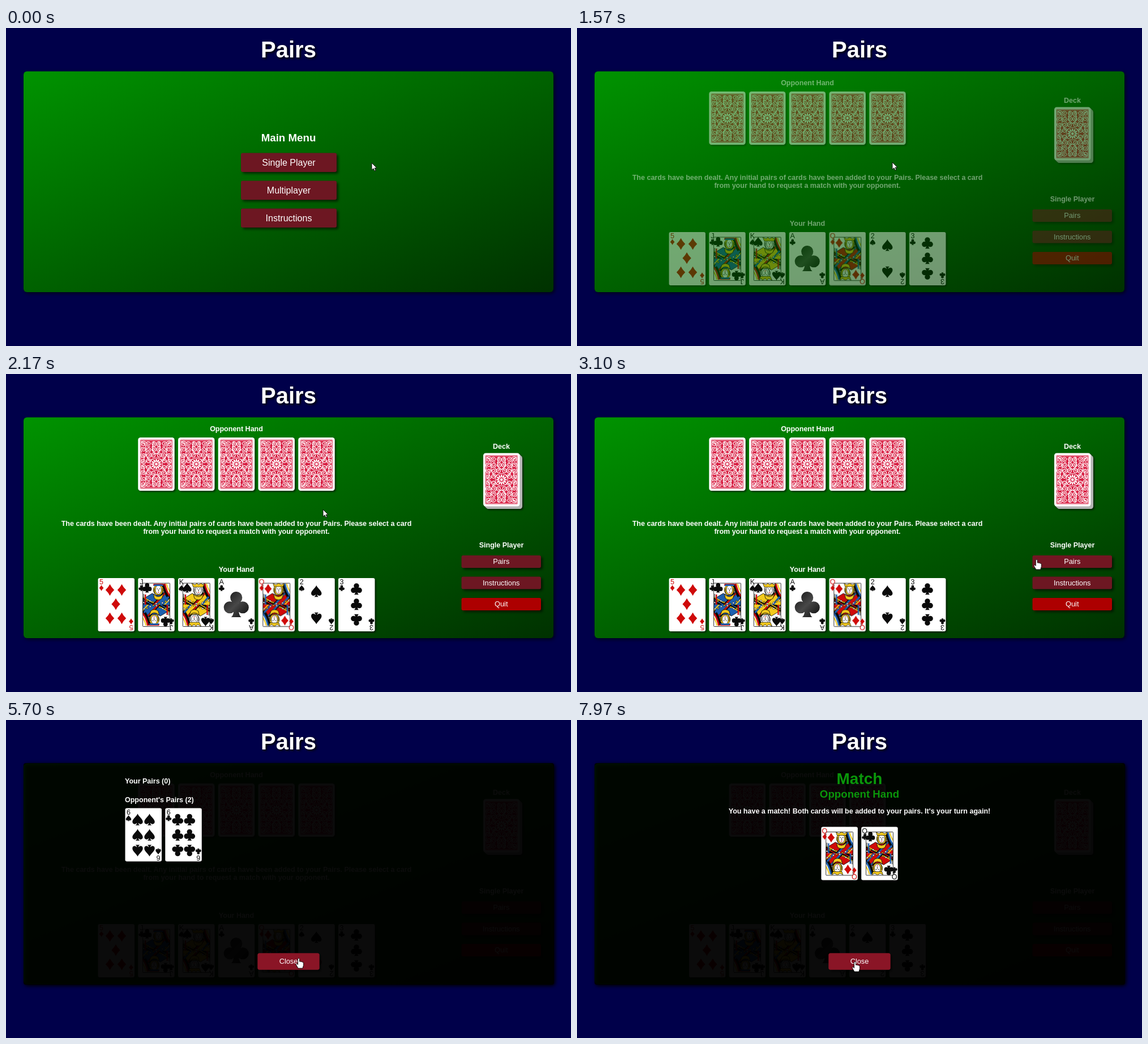
Recreate the animation shown at these times as an HTML page. Size 998 px wide and 561 px high, loop 8 s.

```html
<!DOCTYPE html>
<html lang="en">
<head>
<meta charset="utf-8">
<title>Pairs</title>
<style>
html, body { margin: 0; width: 100%; height: 100%; overflow: hidden; background: #00004a; }
svg#stage { display: block; width: 100vw; height: 100vh; font-family: "Liberation Sans", Arial, sans-serif; fill: #fff; }
.b { font-weight: bold; }
.mid { text-anchor: middle; }
.title { font-size: 40px; filter: drop-shadow(2px 2px 2px #000); }
.panel { filter: drop-shadow(2px 2px 3px rgba(0,0,0,.75)); }
.btn { filter: drop-shadow(3px 3px 2px rgba(0,0,0,.6)); }
.card { filter: drop-shadow(2px 2px 1.5px rgba(0,0,0,.6)); }

/* One 8 s timeline: 1% = 80 ms */
.menu, .game, .pairs, .match, .before, .after, .cursor, .hand, .arrow, .picked, .hot { animation: 8s infinite; }
.menu { animation-name: menu; animation-timing-function: ease-in-out; }
.game { animation-name: game; animation-timing-function: ease-in-out; }
.pairs { animation-name: pairs; animation-timing-function: ease-in-out; }
.match { animation-name: match; animation-timing-function: ease-in-out; }
.before { animation-name: before; animation-timing-function: step-end; }
.after { animation-name: after; animation-timing-function: step-end; }
.cursor { animation-name: cursor; animation-timing-function: ease-in-out; }
.hand { animation-name: hand; animation-timing-function: step-end; }
.arrow { animation-name: arrow; animation-timing-function: step-end; }
.picked { animation-name: picked; animation-timing-function: ease-out; }
.hot { opacity: 0; animation-timing-function: linear; }
.hot.single { animation-name: hotSingle; }
.hot.list { animation-name: hotList; }
.hot.closeA { animation-name: hotCloseA; }
.hot.closeB { animation-name: hotCloseB; }

@keyframes menu { 0%, 11.2% { opacity: 1 } 16.2%, 100% { opacity: 0 } }
@keyframes game { 0%, 17.3% { opacity: 0 } 22.3%, 100% { opacity: 1 } }
@keyframes pairs { 0%, 42% { opacity: 0 } 47%, 72.2% { opacity: 1 } 77.2%, 100% { opacity: 0 } }
@keyframes match { 0%, 85.5% { opacity: 0 } 90.5%, 100% { opacity: 1 } }
@keyframes before { 0% { opacity: 1 } 85.5%, 100% { opacity: 0 } }
@keyframes after { 0% { opacity: 0 } 85.5%, 100% { opacity: 1 } }
@keyframes cursor {
  0%, 1% { transform: translate(646px, 238px) }
  8%, 20% { transform: translate(557px, 237px) }
  25%, 28.5% { transform: translate(560px, 239px) }
  39%, 52% { transform: translate(812px, 327px) }
  64%, 72.5% { transform: translate(517px, 420px) }
  79.5%, 86.5% { transform: translate(470px, 407px) }
  95%, 100% { transform: translate(491px, 426px) }
}
@keyframes hand {
  0% { opacity: 0 } 6% { opacity: 1 } 16.2% { opacity: 0 } 38.5% { opacity: 1 } 42.2% { opacity: 0 }
  61.5% { opacity: 1 } 100% { opacity: 1 }
}
@keyframes arrow {
  0% { opacity: 1 } 6% { opacity: 0 } 16.2% { opacity: 1 } 38.5% { opacity: 0 } 42.2% { opacity: 1 }
  61.5% { opacity: 0 } 100% { opacity: 0 }
}
@keyframes picked { 0%, 78% { transform: none } 81%, 100% { transform: translate(-1px, -2.2px) scale(1.025) } }
@keyframes hotSingle { 0%, 6% { opacity: 0 } 8%, 16% { opacity: 1 } 17%, 100% { opacity: 0 } }
@keyframes hotList { 0%, 38.5% { opacity: 0 } 40%, 42% { opacity: 1 } 44%, 100% { opacity: 0 } }
@keyframes hotCloseA { 0%, 61.5% { opacity: 0 } 63.5%, 77% { opacity: 1 } 78%, 100% { opacity: 0 } }
@keyframes hotCloseB { 0%, 92% { opacity: 0 } 94%, 100% { opacity: 1 } }
</style>
</head>
<body>
<svg id="stage" viewBox="0 0 998 561" preserveAspectRatio="none"></svg>
<script>
const W = 64.5, H = 94, PITCH = 70.75, HAND_MID = 407;
const RED = '#cf0a0a', BLUE = '#1d5fae', GOLD = '#f2c91d', INK = '#0a0a0a';

const disc = (x, y, r = 4.6) => `M${x - r} ${y}a${r} ${r} 0 1 1 ${2 * r} 0a${r} ${r} 0 1 1 ${-2 * r} 0Z`;
const SUITS = {
  spade: 'M0-10C2-5 9-1 9 4C9 9 3 9 1.2 5.5C1.5 8 2.5 9.5 4 10H-4C-2.5 9.5-1.5 8-1.2 5.5C-3 9-9 9-9 4C-9-1-2-5 0-10Z',
  club: disc(0, -5) + disc(-5, 2.5) + disc(5, 2.5) + 'M-1.6-2H1.6C1.5 7 2.5 9 4 10H-4C-2.5 9-1.5 7-1.6-2Z',
  diamond: 'M0-10Q3-4 7.5 0Q3 4 0 10Q-3 4-7.5 0Q-3-4 0-10Z'
};
const PIPS = {
  2: [[32, 23], [32, 71]],
  3: [[32, 19], [32, 46], [32, 74]],
  5: [[21, 21], [42, 21], [31.5, 46], [21, 71], [42, 71]],
  6: [[22, 20], [43, 20], [22, 47], [43, 47], [22, 75], [43, 75]]
};

const suitColor = suit => suit === 'diamond' ? RED : INK;
const rect = (x, y, w, h, fill, r = 0, more = '') =>
  `<rect x="${x}" y="${y}" width="${w}" height="${h}" rx="${r}" fill="${fill}" ${more}/>`;
const path = (d, fill, more = '') => `<path d="${d}" fill="${fill}" ${more}/>`;
const line = (d, color, width) => path(d, 'none', `stroke="${color}" stroke-width="${width}"`);
const text = (s, x, y, size, cls = 'b mid', fill = '#fff') =>
  `<text x="${x}" y="${y}" font-size="${size}" class="${cls}" fill="${fill}">${s}</text>`;
const at = (x, y, body, cls = '') => `<g transform="translate(${x} ${y})"><g class="${cls}">${body}</g></g>`;
const twice = body => body + `<g transform="rotate(180 ${W / 2} ${H / 2})">${body}</g>`;

function pip(suit, x, y, size, fill = suitColor(suit)) {
  const s = size / 20 * (y > 55 ? -1 : 1);
  return path(SUITS[suit], fill, `transform="translate(${x} ${y}) scale(${s})"`);
}

function courtHalf(rank) {
  const [robe, trim, hair] = { J: [BLUE, RED, GOLD], Q: [RED, BLUE, GOLD], K: [GOLD, RED, '#fff'] }[rank];
  const hat = {
    J: rect(27, 10, 18, 4, RED, 1) + path('M27 14H45L43 11H29Z', BLUE),
    Q: path('M28 15L26 9L31 12L36 9L41 12L46 9L44 15Z', GOLD, `stroke="${INK}" stroke-width=".7"`),
    K: path('M27 16L24 9L30 12L33 9L36 12L41 9L43 12L47 9L44 16Z', GOLD, `stroke="${INK}" stroke-width=".7"`)
  }[rank];
  let dots = '';
  for (let i = 0; i < 9; i++) {
    const x = 10 + i * 5.5;
    dots += path(disc(x, 43 - 3 * Math.sin(i), 1.5), i % 2 ? GOLD : '#fff', `stroke="${INK}" stroke-width=".6"`);
  }
  return path('M8.5 48V37L25 27Q35 35 45 25L56.5 31V48Z', robe, `stroke="${INK}" stroke-width=".8"`)
    + line('M44 11Q49 30 57 38', INK, 5) + line('M47 10Q51 27 58 34', trim, 3)
    + line('M50 10Q53 20 58 27', GOLD, 2)
    + line('M9 35L30 47M9 41L22 48', INK, 3.5) + line('M9 34L31 46', GOLD, 1.8)
    + line('M46 27L27 48', INK, 4.5) + line('M47 27L28 48', trim, 3)
    + line('M54 33L41 48', BLUE, 3.4) + line('M56 37L46 48', GOLD, 2)
    + line('M13 29V47', trim, 2.4) + line('M10 28V48', INK, 1)
    + path('M27 28Q36 38 45 27L42 36Q36 41 29 36Z', GOLD, `stroke="${INK}" stroke-width=".8"`)
    + dots
    + `<ellipse cx="36" cy="21" rx="9" ry="9" fill="${hair}" stroke="${INK}" stroke-width=".8"/>`
    + line('M29 18Q28 24 30 29M43 18Q44 24 42 29', INK, .9)
    + `<ellipse cx="36" cy="20.5" rx="5.3" ry="7.8" fill="#fff" stroke="${INK}" stroke-width=".7"/>`
    + line('M33 19H35M37 19H39.5M36 20V23H37', INK, .8) + line('M34.5 25.3H37.5', RED, .9)
    + hat;
}

function courtArt(rank, suit) {
  const half = `<g clip-path="url(#half)">${courtHalf(rank)}</g>`;
  const [x, y] = suit === 'diamond' ? [17.5, 19] : [16, 17];
  return twice(half + pip(suit, x, y, 17))
    + rect(8.3, 9, W - 16.6, H - 17.5, 'none', 1, `stroke="${INK}" stroke-width=".8"`);
}

function face(rank, suit) {
  const index = text(rank, 6, 11, 12.5, 'mid', suitColor(suit)) + pip(suit, 6, 17.5, 10.5);
  let art;
  if (PIPS[rank]) art = PIPS[rank].map(([x, y]) => pip(suit, x, y, 20.5)).join('');
  else if (rank === 'A') art = pip(suit, 32, 46, 46, 'url(#ace)');
  else art = courtArt(rank, suit);
  return rect(0, 0, W, H, '#fff', 3) + art + twice(index);
}

function spiral(cx, cy, radius, start, dir) {
  let d = '';
  for (let i = 0; i <= 18; i++) {
    const a = start + dir * i * .58, r = radius * (1 - i / 22);
    d += `${i ? 'L' : 'M'}${(cx + r * Math.cos(a)).toFixed(1)} ${(cy + r * Math.sin(a)).toFixed(1)}`;
  }
  return d;
}

function backArt() {
  let curls = '';
  for (let row = 0; row < 4; row++)
    for (let col = 0; col < 3; col++)
      curls += spiral(9.5 + col * 9, 11 + row * 10.2, 5.2, row * 2 + col, (row + col) % 2 ? 1 : -1);
  curls += 'M6 7Q16 13 14 24T25 44M28 7Q22 20 30 29M7 45Q13 39 10 30';
  const quarter = line(curls, '#fff', 1.15);
  const cx = W / 2, cy = H / 2;
  let petals = '';
  for (let i = 0; i < 12; i++)
    petals += `<ellipse cx="${cx}" cy="${cy - 6.5}" rx="1.3" ry="3" transform="rotate(${i * 30} ${cx} ${cy})" fill="#fff"/>`;
  return rect(0, 0, W, H, '#fff', 4.5) + rect(4, 4, W - 8, H - 8, '#d81f43', 1)
    + [[1, 1], [-1, 1], [1, -1], [-1, -1]].map(([sx, sy]) =>
      `<g transform="translate(${cx} ${cy}) scale(${sx} ${sy}) translate(${-cx} ${-cy})">${quarter}</g>`).join('')
    + rect(5.3, 5.3, W - 10.6, H - 10.6, 'none', 0, 'stroke="#fff" stroke-width=".6"')
    + path(disc(cx, cy, 11), '#d81f43', 'stroke="#fff" stroke-width="1"') + petals
    + path(disc(cx, cy, 2.4), '#fff');
}

const card = (id, x, y, cls = '') => at(x, y, `<use href="#${id}" class="card"/>`, cls);
const rowStart = n => HAND_MID - (n * PITCH - PITCH + W) / 2;
const row = (ids, y) => ids.map((id, i) =>
  card(id, rowStart(ids.length) + i * PITCH, y, id === 'Qdiamond' ? 'picked' : '')).join('');

function button(label, x, y, w, h, size, hot = '', fill = '#6d1722') {
  return `<g class="btn">${rect(x, y, w, h, fill, 3)}`
    + (hot && rect(x, y, w, h, '#8a1526', 3, `class="hot ${hot}"`)) + '</g>'
    + text(label, x + w / 2, y + h / 2 + size * .35, size, 'mid');
}

const overlay = (cls, hot, body) => `<g class="${cls}">`
  + rect(31, 76, 937, 391, 'rgba(0,0,0,.87)', 4, 'class="panel"') + body
  + button('Close', 444.5, 411.5, 109, 29, 12.8, hot, '#741825') + '</g>';

const hand = [['5', 'diamond'], ['J', 'club'], ['K', 'spade'], ['A', 'club'], ['Q', 'diamond'], ['2', 'spade'], ['3', 'club']];
const deckOfFaces = [...hand, ['6', 'spade'], ['6', 'club'], ['Q', 'club']];
const handIds = hand.map(c => c.join(''));
const backs = n => Array(n).fill('back');

const defs = `<defs>
  <linearGradient id="felt" gradientUnits="userSpaceOnUse" x1="363" y1="-66" x2="635" y2="608">
    <stop offset="0" stop-color="#009400"/><stop offset="1" stop-color="#003000"/></linearGradient>
  <linearGradient id="ace" x1="0" y1="0" x2="1" y2="1">
    <stop offset="0" stop-color="#111"/><stop offset=".5" stop-color="#484848"/><stop offset="1" stop-color="#0c0c0c"/></linearGradient>
  <clipPath id="half"><rect x="8.3" y="9" width="${W - 16.6}" height="${H / 2 - 9}"/></clipPath>
  <g id="back">${backArt()}</g>
  ${deckOfFaces.map(([rank, suit]) => `<g id="${rank + suit}">${face(rank, suit)}</g>`).join('')}
</defs>`;

const menu = `<g class="menu">` + text('Main Menu', 499, 200, 18.72)
  + button('Single Player', 415, 220.5, 169, 33.5, 16, 'single')
  + button('Multiplayer', 415, 269.5, 169, 33.5, 16)
  + button('Instructions', 415, 318.5, 169, 33.5, 16) + '</g>';

const deck = at(843, 139.5, [4.5, 3, 1.5].map(o => rect(o, o, W, H, '#b4b4b4', 4.5)).join('')
  + '<use href="#back"/>', 'card');

const game = `<g class="game">` + text('Opponent Hand', HAND_MID, 101, 12.5)
  + text('Your Hand', HAND_MID, 349, 12.5) + text('Deck', 875, 132, 12.5) + deck
  + `<g class="before">${row(backs(5), 112)}${row(handIds, 360)}`
  + text('The cards have been dealt. Any initial pairs of cards have been added to your Pairs. Please select a card', HAND_MID, 268, 12.5)
  + text('from your hand to request a match with your opponent.', HAND_MID, 282, 12.5) + '</g>'
  + `<g class="after">${row(backs(4), 112)}${row(handIds.filter(id => id !== 'Qdiamond'), 360)}</g>`
  + text('Single Player', 875, 306, 12.5)
  + button('Pairs', 804.5, 320, 140.5, 22, 12.8, 'list')
  + button('Instructions', 804.5, 357.5, 140.5, 22, 12.8)
  + button('Quit', 804.5, 395, 140.5, 22, 12.8, '', '#ad0000') + '</g>';

const pairsView = overlay('pairs', 'closeA', text('Your Pairs (0)', 210, 112, 12.5, 'b')
  + text('Opponent\'s Pairs (2)', 210, 145, 12.5, 'b')
  + card('6spade', 210.5, 155.5) + card('6club', 281.25, 155.5));

const matchView = overlay('match', 'closeB', text('Match', 499, 113, 28, 'b mid', '#0a960a')
  + text('Opponent Hand', 499, 137, 18.72, 'b mid', '#0a960a')
  + text('You have a match! Both cards will be added to your pairs. It\'s your turn again!', 499, 165, 12.5)
  + card('Qdiamond', 431.4, 188.5) + card('Qclub', 502.2, 188.5));

const outline = 'stroke="#000" stroke-width=".9" stroke-linejoin="round"';
const cursor = `<g class="cursor">`
  + path('M0 0V12.5L3 9.8L5 14.2L7 13.3L5.1 9H9Z', '#fff', `class="arrow" ${outline}`)
  + path('M-1.5 1.5Q0-1 1.5 1.5V6.2Q3 5.2 4.2 6.6Q5.6 5.8 6.6 7.2Q8.4 6.8 8.6 8.8V12.5L7 18H-1L-4.6 11.8Q-5.2 9.6-3.4 9.8L-1.5 11.5Z',
    '#fff', `class="hand" ${outline}`) + '</g>';

document.getElementById('stage').innerHTML = defs + rect(0, 0, 998, 561, '#00004a')
  + text('Pairs', 499, 51.5, 40, 'b mid title')
  + rect(31, 76.5, 936, 389.5, 'url(#felt)', 6, 'class="panel"')
  + menu + game + pairsView + matchView + cursor;
</script>
</body>
</html>
```
